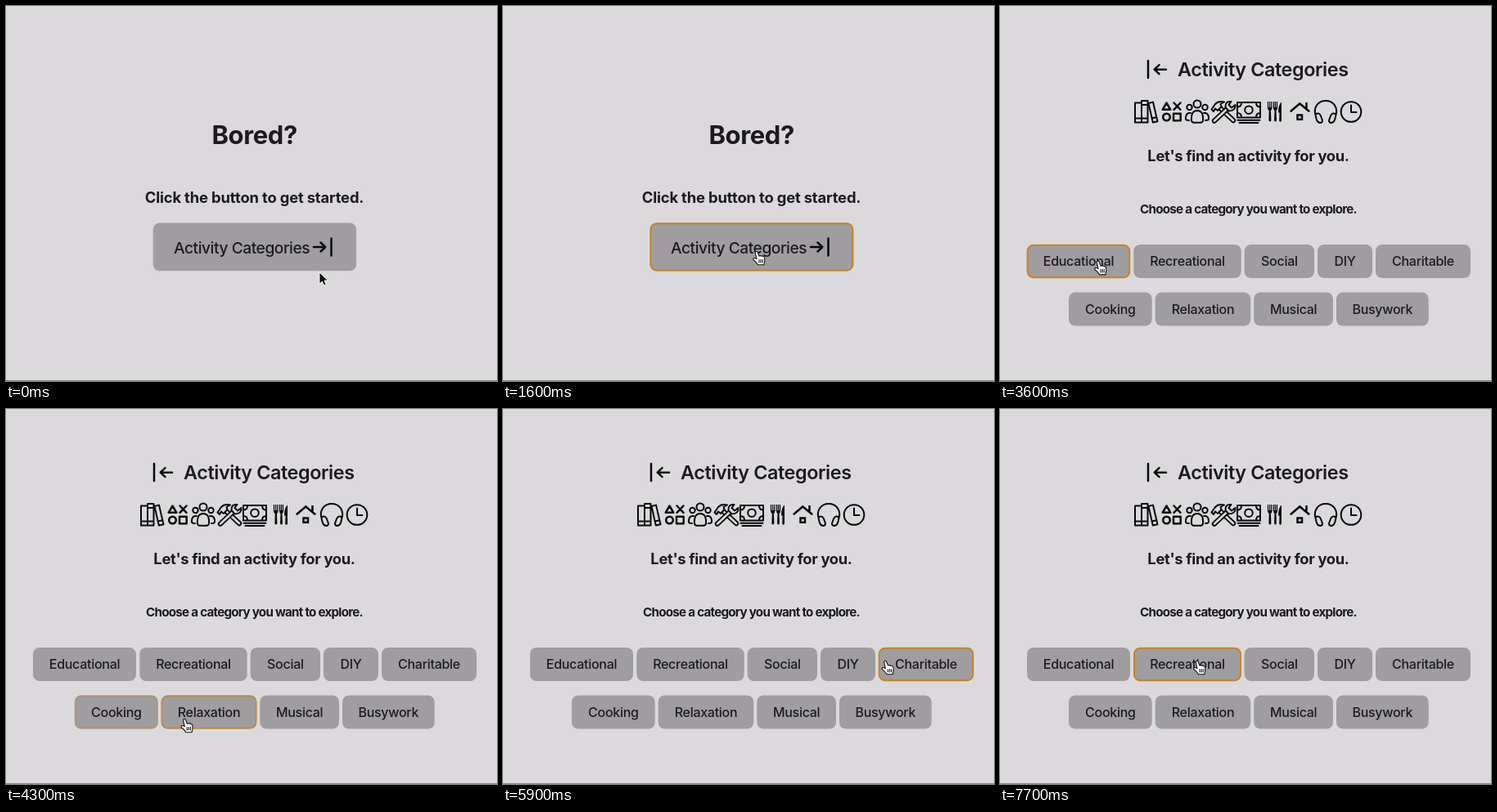
Recreate the animation shown at these times as an HTML page. Size 600 px wide and 459 px high, loop 8 s.

```html
<!DOCTYPE html>
<html lang="en">
<head>
<meta charset="utf-8">
<title>Activity categories</title>
<style>
  html, body { margin: 0; width: 100%; height: 100%; overflow: hidden; background: #dbd9dc; }
  svg { display: block; width: 600px; height: 459px; }
  text { font-family: Inter, "Liberation Sans", sans-serif; letter-spacing: -.018em; fill: #1c1a1f; }
  .mid { text-anchor: middle; }
  .line { fill: none; stroke: #09080a; stroke-width: 2; stroke-linejoin: round; stroke-linecap: round; }
  .wide { stroke-width: 2.5; }
  .sharp { stroke-linecap: butt; stroke-linejoin: miter; }
  .solid { fill: #09080a; }
  .handle { stroke-width: 6.4; }
  .inner { stroke: #dbd9dc; stroke-width: 2.6; }
  .paper { fill: #dbd9dc; }
  .label { font-size: 16px; font-weight: 500; text-anchor: middle; }
  .start { font-size: 19.2px; font-weight: 500; letter-spacing: -.024em; }
  .h1 { font-size: 31px; font-weight: 700; letter-spacing: -.012em; }
  .h2 { font-size: 23.4px; font-weight: 600; }
  .h3 { font-size: 18.4px; font-weight: 700; }
  .loose { letter-spacing: -.009em; }
  .h4 { font-size: 15.2px; font-weight: 700; letter-spacing: -.05em; }
</style>
</head>
<body>
<svg viewBox="0 0 600 459" xmlns="http://www.w3.org/2000/svg">
  <rect width="600" height="459" fill="#dbd9dc"/>
  <rect y="458" width="600" height="1" fill="#858386"/>

  <g id="home">
    <text class="mid h1" x="303.7" y="169">Bored?</text>
    <text class="mid h3 loose" x="303.5" y="241">Click the button to get started.</text>
    <g id="homeButtons"></g>
    <text class="start" x="205" y="302.7">Activity Categories</text>
    <path class="line wide" d="M376 295h14M384.5 289.5l5.8 5.5-5.8 5.5M397.5 284.5v21"/>
  </g>

  <g id="list">
    <path class="line wide" d="M181 67v21M203 77.7h-14M194.5 72.2l-5.8 5.5 5.8 5.5"/>
    <text class="h2" x="217" y="86">Activity Categories</text>

    <path id="books" class="line" d="M165 118.500h8v24h-8zM173 116h7.500v26.500H173zM181.500 119l5.500-1.400 5.500 23.600-5.700 1.300zM165 137.500h15M173 121h7M185.500 137.500l5.500-1.300"/>
    <g id="shapes" class="line wide">
      <path d="M203.500 118.500l4.800 8.300h-9.600zM212.500 118.500l8 8.300M220.500 118.500l-8 8.300M212 131.800h8.700v8.500H212z"/>
      <circle cx="203.5" cy="136" r="4.3"/>
    </g>
    <g id="people" class="line">
      <circle cx="241" cy="120" r="4.5"/>
      <circle cx="231.5" cy="124" r="3.2"/>
      <circle cx="250.5" cy="124" r="3.2"/>
      <path d="M234 140.500Q233 128 241 128T248 140.500Q247.500 142.800 244 142.800H238Q234.500 142.800 234 140.500ZM233 131H231Q226.500 132 227 138.500 227.500 140 231 140M249 131H251Q255.500 132 255 138.500 254.500 140 251 140"/>
    </g>
    <g id="tools" class="line">
      <path class="handle" d="M268 124l17 16"/>
      <path class="inner" d="M268 124l17 16"/>
      <path class="handle" d="M262 140.500l16-15"/>
      <path class="inner" d="M262 140.500l17-16"/>
      <path class="paper" d="M282.500 117Q275 116 275.500 124L279.500 128.500Q288 128.500 287.500 121L283 124.500 279.500 121Z"/>
      <path class="paper" d="M258.500 126.500L263 120Q267 115.500 274 117.500L269.500 120 270.500 123 266 128 263 125.500 261 129Z"/>
    </g>
    <g id="cash" class="line">
      <path d="M290 118h28v18.500h-28zM290.500 139.800h27M292.500 143h23M290 123.500q5 0 5-5M318 123.500q-5 0-5-5M290 131q5 0 5 5M318 131q-5 0-5 5"/>
      <circle cx="304" cy="127.2" r="4.8"/>
    </g>
    <g id="cutlery">
      <path class="line sharp" style="stroke-width:1.2" d="M327.500 117v8M329.700 117v8M331.900 117v8M334.500 117v8M336.500 117v8M338.500 117v8"/>
      <path class="solid" d="M327 124h5.500q0 3-1.600 4l.5 12q-1.500 3-3 0l.4-12q-1.800-1-1.800-4zM334 124h5q0 3-1.500 4l.5 12q-1.500 3-3 0l.5-12q-1.500-1-1.500-4zM344 117.500v23q-1.500 2.500-2.800 0l.3-10h-1.500q0-10 4-13z"/>
    </g>
    <path id="house" class="line wide sharp" d="M354.800 129.300L366.300 119.500 378.200 129.300M374.500 118v7M363.500 133.500h5.500v5.300h-5.500z"/>
    <path id="headphones" class="line" d="M386 135.500C382 124 389 116 398 116S414 124 410 135.500M386 132Q390 130 392 134.500L394 140Q394 143 391 143 387 142.500 386 135.500M410 132Q406 130 404 134.500L402 140Q402 143 405 143 409 142.500 410 135.500"/>
    <g id="clock" class="line">
      <circle cx="429" cy="129.5" r="12.3"/>
      <path d="M429 121.500v8.500h6.500"/>
    </g>

    <text class="mid h3" x="303.5" y="190">Let's find an activity for you.</text>
    <text class="mid h4" x="303.5" y="253.5">Choose a category you want to explore.</text>
    <g id="listButtons"></g>
  </g>

  <g id="cursor">
    <path id="arrow" transform="scale(.93)" d="M0 0V15.200L3.600 11.900 6 17.300 8.700 16.100 6.400 10.800H11.200Z" fill="#000" stroke="#fff"/>
    <g id="hand" transform="translate(0 -1)" stroke="#111" stroke-width="1.1" stroke-linejoin="round" stroke-linecap="round">
      <path fill="#fff" d="M-1.800 1.500Q-.5-.7 1 1L3.200 6.200Q4.500 5 5.600 6.200 7 5.400 7.900 6.800 9.300 6.600 9.600 8.500 10.400 12 8.800 16.800H1.600Q0 13.500-3.400 11.200-5 9.600-3.600 8.600-2.200 8.200 0 9.600Z"/>
      <path fill="none" d="M3 10.500v3.500M5.100 10.500v3.500M7.200 10.500v3.500"/>
    </g>
  </g>
</svg>

<script>
const LOOP = 8000, SWAP = 1700, FADE = 250;
const $ = id => document.getElementById(id);

function add(parent, tag, attrs) {
  const el = document.createElementNS("http://www.w3.org/2000/svg", tag);
  for (const key in attrs) el.setAttribute(key, attrs[key]);
  return parent.appendChild(el);
}

function makeButton(parent, page, left, right, top, bottom, label) {
  const w = right - left, h = bottom - top;
  add(parent, "rect", { x: left, y: top, width: w, height: h, rx: 8, fill: "#9f9da0" });
  const ring = add(parent, "rect", {
    x: left + .7, y: top + .7, width: w - 1.4, height: h - 1.4, rx: 7.3,
    fill: "none", stroke: "#ca841a", "stroke-width": 2
  });
  if (label) {
    add(parent, "text", { class: "label", x: (left + right) / 2, y: top + 26.3 }).textContent = label;
  }
  return { page, left, right, top, bottom, ring };
}

const rows = [
  [292, [["Educational", 33, 159], ["Recreational", 163.3, 294.7], ["Social", 298.7, 384],
         ["DIY", 388, 455], ["Charitable", 459, 575]]],
  [350.5, [["Cooking", 84, 185.7], ["Relaxation", 189.7, 306.3], ["Musical", 310.3, 407],
           ["Busywork", 411, 523.7]]]
];
const buttons = [makeButton($("homeButtons"), 0, 179.7, 428.1, 265.5, 324.3)];
for (const [top, items] of rows)
  for (const [label, left, right] of items)
    buttons.push(makeButton($("listButtons"), 1, left, right, top, top + 41, label));

// Pointer route: time, x, y
const route = [
  [0, 383, 326], [50, 383, 326], [400, 342, 311], [800, 310, 301], [2500, 310, 301],
  [3000, 212, 306], [3400, 125, 311], [3600, 120, 313], [3800, 125, 332], [4000, 152, 371],
  [4150, 190, 383], [4300, 218, 380], [4700, 335, 376], [5200, 455, 372], [5400, 485, 366],
  [5600, 500, 329], [5900, 467.5, 309], [6100, 462, 308], [6300, 425, 309], [6400, 425, 309],
  [6800, 352, 309], [7200, 258, 310], [7400, 236, 311.5], [7700, 241, 309], [8000, 241, 309]
];

function slope(i, axis) {
  const a = route[i - 1], b = route[i], c = route[i + 1];
  if (!a || !c) return 0;
  const before = b[axis] - a[axis], after = c[axis] - b[axis];
  return before * after <= 0 ? 0 : (before + after) / (c[0] - a[0]);
}

// Smooth curve through the route that never overshoots a turning point.
function pointerAt(t) {
  let i = 0;
  while (i < route.length - 2 && t >= route[i + 1][0]) i++;
  const a = route[i], b = route[i + 1], span = b[0] - a[0], u = (t - a[0]) / span;
  return [1, 2].map(axis =>
    a[axis] * (1 + 2 * u) * (1 - u) ** 2 + b[axis] * u * u * (3 - 2 * u) +
    span * (slope(i, axis) * u * (1 - u) ** 2 - slope(i + 1, axis) * u * u * (1 - u)));
}

const pageAt = t => t < SWAP ? 0 : 1;

function hovers(button, t) {
  if (t < 0 || button.page !== pageAt(t)) return false;
  const [x, y] = pointerAt(t);
  return x >= button.left && x <= button.right && y >= button.top && y <= button.bottom;
}

// Share of the last FADE ms spent hovering gives the ring's opacity.
function ringLevel(button, t) {
  const samples = 25;
  let hits = 0;
  for (let k = 0; k < samples; k++) hits += hovers(button, t - k * FADE / samples);
  return hits / samples;
}

function render(t) {
  const page = pageAt(t), [x, y] = pointerAt(t);
  $("home").style.display = page ? "none" : "";
  $("list").style.display = page ? "" : "none";
  for (const b of buttons) if (b.page === page) b.ring.setAttribute("stroke-opacity", ringLevel(b, t));
  const over = buttons.some(b => hovers(b, t));
  $("hand").style.display = over ? "" : "none";
  $("arrow").style.display = over ? "none" : "";
  $("cursor").setAttribute("transform", `translate(${x} ${y})`);
}

const start = performance.now();
function tick() {
  render((performance.now() - start) % LOOP);
  requestAnimationFrame(tick);
}
tick();
</script>
</body>
</html>
```
